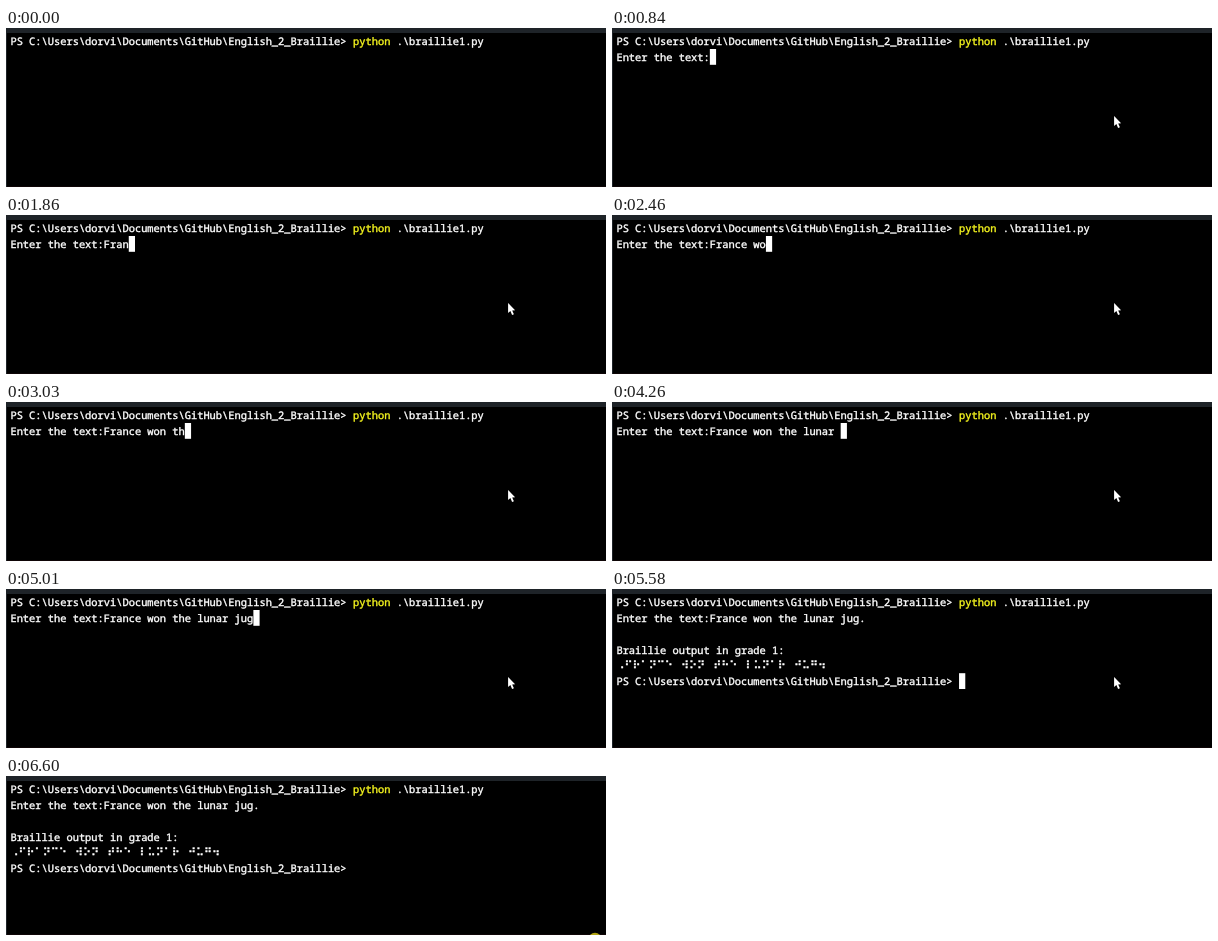
Recreate the animation shown at these times as an HTML page with a canvas. Size 600 by 159 pixels, loop 6.69 s.

```html
<!DOCTYPE html>
<html lang="en">
<head>
<meta charset="utf-8">
<title>Braille converter in a terminal</title>
<style>
  html, body { margin: 0; width: 100%; height: 100%; overflow: hidden; background: #000; }
  canvas { display: block; }
</style>
</head>
<body>
<canvas id="stage" width="600" height="159"></canvas>
<script>
const ctx = document.getElementById('stage').getContext('2d');
const LOOP = 6690;
const LEFT = 4.4, CHAR = 6.23, TOP = 5.2, LINE = 15.8;
const MONO = '10.38px "Noto Sans Mono", monospace';
const BRAILLE = '11.03px "DejaVu Sans", sans-serif';
const WHITE = '#fff', YELLOW = '#f5f51e';

const PROMPT = 'PS C:\\Users\\dorvi\\Documents\\GitHub\\English_2_Braillie> ';
const COMMAND = 'python', ARGUMENT = ' .\\braillie1.py';
const QUESTION = 'Enter the text:';
const ANSWER = 'France won the lunar jug.';
const CELLS = '⠠⠋⠗⠁⠝⠉⠑ ⠺⠕⠝ ⠞⠓⠑ ⠇⠥⠝⠁⠗ ⠚⠥⠛⠲'.replace(/ /g, '\u2800');

// Moment at which each character of the answer is typed
const KEY_TIMES = [1410, 1500, 1620, 1860, 1980, 2130, 2220, 2370, 2460, 2610, 2700, 2880, 3030,
  3120, 3240, 3630, 3720, 3900, 4050, 4170, 4260, 4590, 4890, 5010, 5340];
const ENTER = 750, ASK = 840, RESULT = 5580;

ctx.textRendering = 'geometricPrecision';
ctx.lineWidth = 0.4;
ctx.lineJoin = 'round';
ctx.font = BRAILLE;
const brailleDrop = ctx.measureText('⠿').actualBoundingBoxDescent;

const between = (t, start, end) => t >= start && t < end;
const clamp = x => Math.min(1, Math.max(0, x));
const easeOut = x => 1 - (1 - x) ** 2;
const easeInOut = x => x * x * (3 - 2 * x);

// The thin outline gives the letters a medium weight
function heavyText(text, x, y, font, color) {
  ctx.font = font;
  ctx.fillStyle = ctx.strokeStyle = color;
  ctx.fillText(text, x, y);
  ctx.strokeText(text, x, y);
}

function write(text, column, row, color = WHITE) {
  heavyText(text, LEFT + column * CHAR, TOP + row * LINE + 11.9, MONO, color);
}

function caret(column, row) {
  ctx.fillStyle = WHITE;
  ctx.fillRect(LEFT + column * CHAR, TOP + row * LINE, CHAR, LINE);
}

function pointer(x, y) {
  const outline = [[0, 0], [0, 10], [2.3, 8], [4, 12], [5.8, 11.2], [4.1, 7.4], [7, 7.2]];
  ctx.beginPath();
  for (const [dx, dy] of outline) ctx.lineTo(x + dx, y + dy);
  ctx.closePath();
  ctx.fillStyle = WHITE;
  ctx.fill();
}

function drawCaret(t, typed) {
  if (t < ENTER) {
    if (t >= 240) caret((PROMPT + COMMAND + ARGUMENT).length, 0);
  } else if (t < ASK) {
    caret(0, 1);
  } else if (t < RESULT) {
    if (!between(t, 1350, KEY_TIMES[0])) caret(QUESTION.length + typed, 1);
  } else if (t < 5700 || between(t, 6150, 6600)) {
    caret(PROMPT.length, 5);
  }
}

function drawPointer(t) {
  if (!between(t, 60, 6450)) return;
  const enter = 1 - easeOut(clamp((t - 60) / 360));
  const leave = easeInOut(clamp((t - 6000) / 450));
  pointer(502.1 + 22 * enter + 88 * leave, 88 + 47 * enter + 75 * leave);
}

function drawWindow() {
  ctx.fillStyle = '#1e2328';
  ctx.fillRect(0, 0, 600, 159);
  ctx.fillStyle = '#000';
  ctx.fillRect(1, 5, 599, 154);
  ctx.fillStyle = '#0e0506';
  ctx.fillRect(1, 158, 599, 1);
}

function draw(t) {
  drawWindow();
  write(PROMPT, 0, 0);
  write(COMMAND, PROMPT.length, 0, YELLOW);
  write(ARGUMENT, PROMPT.length + COMMAND.length, 0);

  const typed = KEY_TIMES.filter(time => time <= t).length;
  if (t >= ASK) write(QUESTION + ANSWER.slice(0, typed), 0, 1);

  if (t >= RESULT) {
    write('Braillie output in grade 1:', 0, 3);
    heavyText(CELLS, LEFT, 80.4 - brailleDrop, BRAILLE, WHITE);
    write(PROMPT, 0, 5);
  }

  drawCaret(t, typed);
  drawPointer(t);

  if (t >= 6600) {
    ctx.fillStyle = '#b0a312';
    ctx.beginPath();
    ctx.arc(589, 163.5, 6.7, 0, 2 * Math.PI);
    ctx.fill();
  }
}

const start = performance.now();
function tick() {
  draw((performance.now() - start) % LOOP);
  requestAnimationFrame(tick);
}
tick();
</script>
</body>
</html>
```
